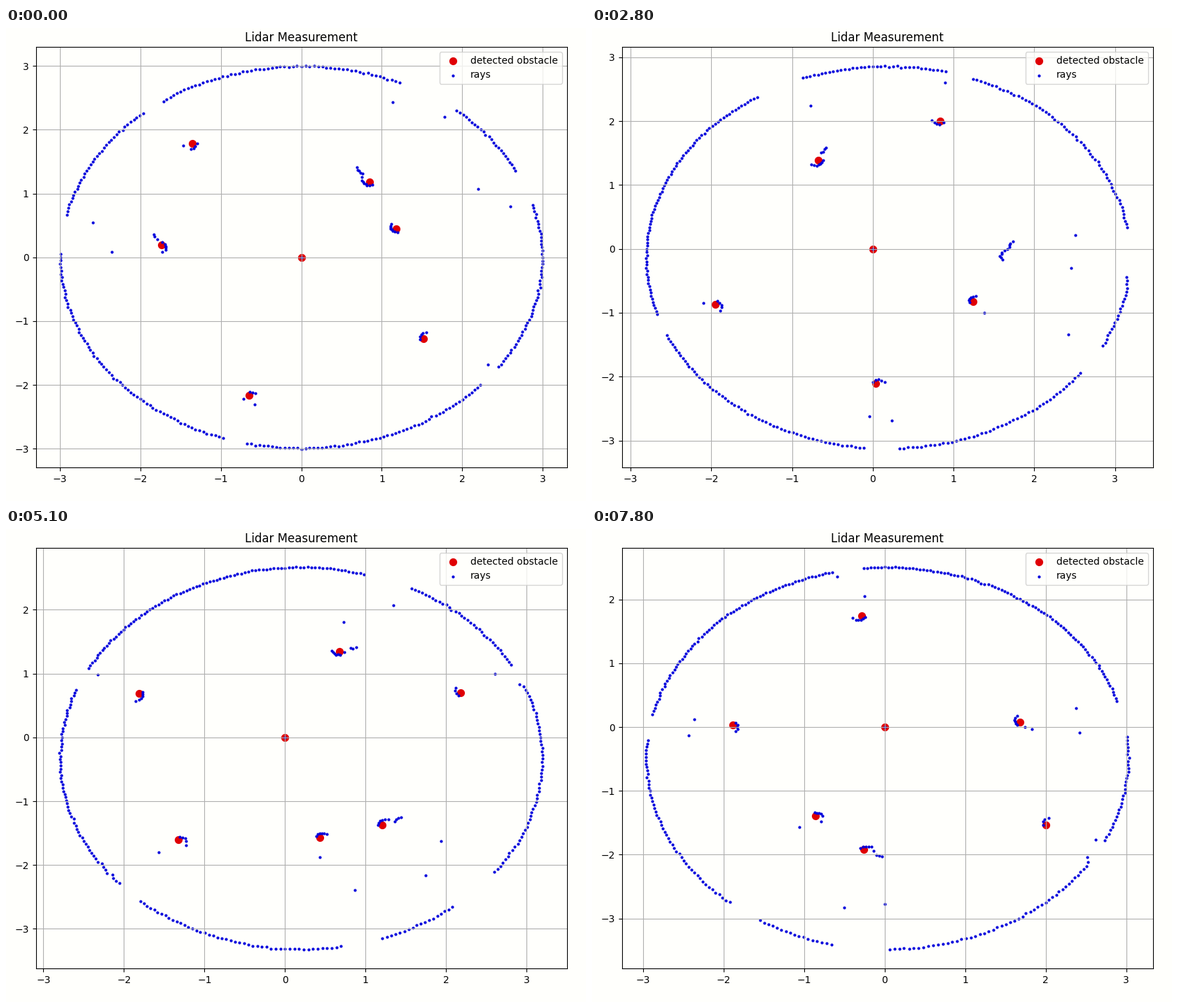
A matplotlib script that plays this animation: 828x676 px, repeating every 8 s.

```python
import numpy as np
import matplotlib.pyplot as plt
from matplotlib.animation import FuncAnimation
from matplotlib.ticker import MultipleLocator

W, H, DPI = 828, 676, 100
FRAMES, INTERVAL = 80, 100
PAPER, RED, BLUE = "#fffffc", "#e00004", "#0000dc"

# Scene: a round wall with pillars, (distance, bearing in degrees)
WALL, PILLAR = 2.992, 0.1
TRACKED = [(2.275, 128.2), (1.493, 55.2), (1.30, 22.0),
           (1.787, 174.7), (2.293, 254.2), (2.02, -38.9)]
HIDDEN = [(1.62, 61.0), (1.94, 170.7)]

# Ticks on which no new scan arrives
HOLDS = {0, 1, 2, 6, 9, 20, 25, 29, 34, 39, 45, 48, 54, 57, 61, 66, 73, 79}
SCAN = np.cumsum([i not in HOLDS for i in range(FRAMES)])

PIVOT = np.array([-0.037, -0.249])
COLS = 57.3  # sensor columns per unit of tan(angle)


def turn(points, deg):
    a = np.radians(deg)
    rot = np.array([[np.cos(a), np.sin(a)], [-np.sin(a), np.cos(a)]])
    return points @ rot


def polar(r, deg):
    a = np.radians(deg)
    return np.column_stack([r * np.cos(a), r * np.sin(a)])


def pose(scan):
    """Heading of the robot and the room centre as the robot sees it."""
    heading = np.interp(scan, [0, 8, 22, 33, 47, 55, 62],
                        [0, 20, 54.3, 81.7, 118.3, 139.1, 155.2])
    return heading, PIVOT + turn(-PIVOT, -heading)


def place(items, heading, centre):
    r, deg = np.array(items).T
    return polar(r, deg - heading) + centre


def cast(deg, centre, pillars):
    d = polar(1.0, deg)
    along = d @ centre
    dist = along + np.sqrt(along ** 2 - centre @ centre + WALL ** 2)
    for p in pillars:
        along = d @ p
        disc = along ** 2 - p @ p + PILLAR ** 2
        hit = (disc > 0) & (along > 0)
        near = along - np.sqrt(np.maximum(disc, 0))
        dist = np.where(hit, np.minimum(dist, near), dist)
    return dist


RAYS = np.arange(360.0)


def measure(centre, pillars):
    """Four 90 degree depth views, blended between neighbouring columns."""
    axis = 90 * np.floor((RAYS + 45) / 90)
    a = RAYS - axis
    a = a + 0.0075 * np.maximum(a, 0)
    u = COLS * np.tan(np.radians(a))
    j = np.floor(u - 0.5) + 0.5
    w = u - j

    def column(c):
        return cast(axis + np.degrees(np.arctan(c / COLS)), centre, pillars)

    return (1 - w) * column(j) + w * column(j + 1)


def detect(centres):
    """Estimated pillar positions; those cut by the scan start are lost."""
    r = np.hypot(*centres.T)
    deg = np.degrees(np.arctan2(centres[:, 1], centres[:, 0]))
    half = np.degrees(PILLAR / r)
    seen = (deg < -half - 0.8) | (deg > half + 0.1)
    return polar(r - 0.04, deg - 1)[seen]


# The small surplus keeps the width from being rounded down
fig = plt.figure(figsize=((W + 0.01) / DPI, (H + 0.01) / DPI), dpi=DPI,
                 facecolor=PAPER)
ax = fig.add_axes([42.5 / W, 1 - 628.5 / H, 758 / W, 601.5 / H],
                  facecolor=PAPER)
ax.set_title("Lidar Measurement")
ax.grid(True)
ax.xaxis.set_major_locator(MultipleLocator(1))
ax.yaxis.set_major_locator(MultipleLocator(1))
spots = ax.scatter([0], [0], s=50, color=RED, label="detected obstacle")
dots = ax.scatter([0], [0], s=4, color=BLUE, label="rays")
ax.legend(loc="upper right", facecolor=PAPER)


def limits(values):
    lo, hi = values.min() - 0.005, values.max() + 0.005
    pad = 0.05 * (hi - lo)
    return lo - pad, hi + pad


def draw(i):
    scan = int(SCAN[i])
    heading, centre = pose(scan)
    tracked = place(TRACKED, heading, centre)
    pillars = np.vstack([tracked, place(HIDDEN, heading, centre)])
    dist = measure(centre, pillars)
    noise = np.random.default_rng(scan).normal(0, 0.006, dist.size)
    clean = polar(dist, RAYS)
    origin = np.zeros((1, 2))
    dots.set_offsets(np.vstack([polar(dist + noise, RAYS), origin]))
    spots.set_offsets(np.vstack([detect(tracked), origin]))
    ax.set_xlim(limits(clean[:, 0]))
    ax.set_ylim(limits(clean[:, 1]))
    return spots, dots


anim = FuncAnimation(fig, draw, frames=FRAMES, interval=INTERVAL,
                     init_func=lambda: draw(0), repeat=True, repeat_delay=0)
plt.show()
```
